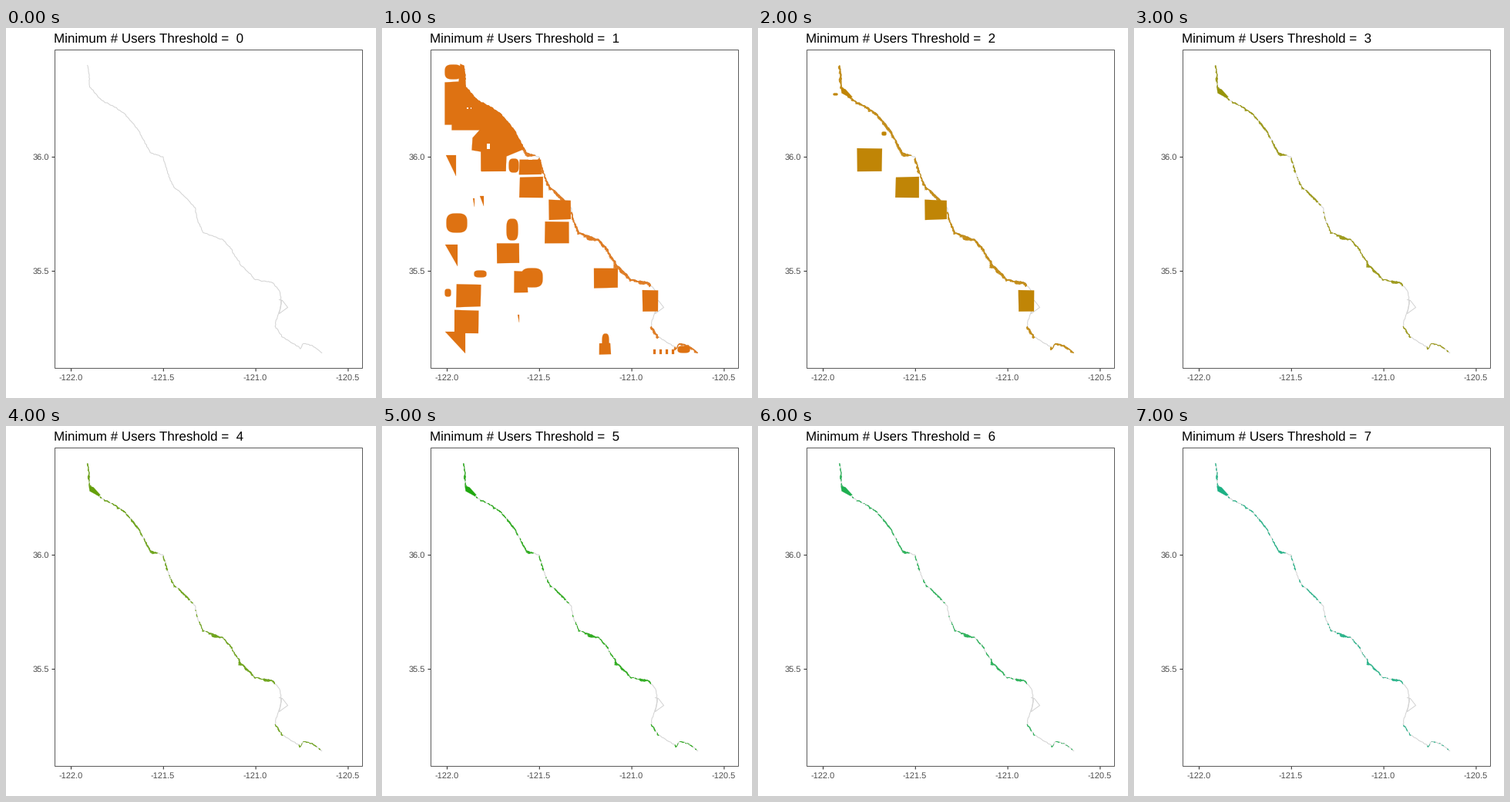
Write a matplotlib script that moves like this. It is 480 px wide and 480 px high and loops after 8000 ms.

```python
import numpy as np
import matplotlib.pyplot as plt
from matplotlib.animation import FuncAnimation
from matplotlib.collections import PolyCollection

SIZE, DPI = 480, 100
PX = 72 / DPI  # points per pixel
plt.rcParams["font.family"] = "Liberation Sans"
plt.rcParams["text.hinting"] = "none"
plt.rcParams["text.hinting_factor"] = 1
rng = np.random.default_rng(7)

COLORS = ["white", "#de7212", "#c08506", "#979409", "#649f0a",
          "#20a80f", "#1eaf50", "#1cb184"]
SEA = np.array([-0.7, 0.7])  # direction from the coast out to sea

# Key points of the shore; fine detail is added as noise
COAST = [
    (105, 48), (108, 62), (108, 76), (124, 94), (137, 100), (153, 110),
    (172, 133), (183, 154), (187, 161), (203, 167), (211, 192), (217, 206),
    (226, 212), (245, 233), (248, 250), (255, 265), (270, 270), (281, 274),
    (293, 288), (303, 305), (323, 326), (346, 330), (355, 342), (357, 357),
    (348, 386), (358, 400), (382, 415), (385, 409), (396, 411), (409, 421),
]
BAY = [(354, 352), (358, 353), (365, 362), (354, 370), (357, 353)]
HEADLAND = [(107, 77), (113, 79), (122, 89), (119, 90), (108, 84)]
INLAND = [(161, 166), (160, 185), (128, 185), (128, 160), (116, 158),
          (117, 142), (126, 132), (90, 132), (90, 125), (81, 125),
          (81, 70), (99, 69), (101, 46)]

# Busy stretches: position x + y, spread, extra width
BUSY = [(172, 8, 1.5), (285, 30, 0.7), (352, 6, 2), (448, 8, 0.8),
        (540, 9, 2.3), (618, 18, 2), (668, 8, 1.8)]
EMPTY = [(362, 372), (470, 483), (681, 735), (760, 792)]

# Patches by extent: x0, y0, x1, y1
SHARED = [(128, 156, 160, 185), (178, 193, 208, 220), (216, 223, 244, 248),
          (338, 340, 358, 367)]
BLOCKS = [(178, 170, 206, 189), (211, 251, 242, 279), (148, 279, 178, 305),
          (171, 315, 188, 343), (275, 311, 305, 337), (96, 332, 128, 361),
          (94, 366, 125, 395), (282, 408, 296, 423)]
WEDGES = [(82, 164, 95, 191), (81, 280, 97, 308), (81, 393, 107, 421),
          (117, 220, 119, 231), (126, 217, 131, 230), (175, 371, 177, 381)]
BLOBS = [(81, 47, 103, 66), (164, 169, 177, 187), (83, 240, 110, 265),
         (161, 247, 176, 275), (119, 314, 135, 323), (180, 311, 208, 336),
         (81, 338, 89, 348), (285, 396, 294, 418), (383, 412, 399, 421)]
SPOTS = [(97, 84, 103, 87), (160, 134, 166, 139)]
HOLES = [(109, 102, 111, 104), (114, 102, 115, 104), (135, 149, 139, 156),
         (189, 166, 194, 170)]


def box(x0, y0, x1, y1):
    return np.array([(x0, y0), (x1, y0), (x1, y1), (x0, y1)], float)


def rough(*extent):
    return box(*extent) + rng.uniform(-0.8, 0.8, (4, 2))


def wedge(x0, y0, x1, y1):
    return np.array([(x0, y0), (x1, y0), (x1, y1)])


def blob(x0, y0, x1, y1):
    a = np.linspace(0, 2 * np.pi, 40, endpoint=False)
    ring = np.column_stack([np.cos(a), np.sin(a)])
    ring = np.sign(ring) * np.abs(ring) ** 0.65
    return (np.array([x0 + x1, y0 + y1]) + ring * [x1 - x0, y1 - y0]) / 2


def resample(points):
    pts = np.array(points, float)
    dist = np.r_[0, np.cumsum(np.hypot(*np.diff(pts, axis=0).T))]
    at = np.arange(0, dist[-1], 1)
    return np.column_stack([np.interp(at, dist, p) for p in pts.T])


def smooth_noise(n, amp):
    return np.convolve(rng.uniform(-amp, amp, n), np.ones(3) / 3, "same")


coast = resample(COAST)
count = len(coast)
place = coast.sum(axis=1)
heat = 1.2 + smooth_noise(count, 2)
for mid, spread, extra in BUSY:
    heat += extra * np.exp(-((place - mid) / spread) ** 2)
for start, end in EMPTY:
    heat[(place > start) & (place < end)] = -9
coast += np.column_stack([smooth_noise(count, 1), smooth_noise(count, 1)])


def band(cut):
    """Quads on the seaward side of the coast, narrower for a higher cut."""
    width = heat - cut
    quads = []
    for i in np.flatnonzero(width[:-1] > 0.4):
        a, b = coast[i:i + 2] - 0.4 * SEA
        off = max(width[i], 1) * SEA
        quads.append([a, b, b + off, a + off])
    return quads


shared = [rough(*e) for e in SHARED]
mainland = np.vstack([coast[place < 342], INLAND])
inland = ([mainland] + shared + [rough(*e) for e in BLOCKS]
          + [wedge(*e) for e in WEDGES] + [blob(*e) for e in BLOBS]
          + [box(x, 416, x + 3, 422) for x in range(351, 382, 8)])


def areas(level):
    if level == 0:
        return []
    if level == 1:
        return band(-1.3) + inland
    if level == 2:
        return band(-1.1) + [HEADLAND] + shared + [blob(*e) for e in SPOTS]
    return band(0.2 + 0.18 * (level - 3)) + [HEADLAND]


fig = plt.figure(figsize=(SIZE / DPI, SIZE / DPI), dpi=DPI, facecolor="white")
ax = fig.add_axes([0, 0, 1, 1])
ax.set_xlim(-0.5, SIZE - 0.5)
ax.set_ylim(SIZE - 0.5, -0.5)
ax.axis("off")

for line in (coast, np.array(BAY)):
    ax.plot(*line.T, color="#d3d3d3", lw=PX, zorder=1)
region = PolyCollection([], linewidths=0.2 * PX, zorder=2)
holes = PolyCollection([box(*e) for e in HOLES], facecolors="white", zorder=3)
ax.add_collection(region, autolim=False)
ax.add_collection(holes, autolim=False)

ax.add_patch(plt.Rectangle((63, 28), 399, 413, fill=False, ec="#5c5c5c",
                           lw=PX, snap=False, zorder=4))
tick = dict(color="#333333", lw=1.1 * PX, solid_capstyle="butt", snap=False,
            zorder=4)
label = dict(color="#4d4d4d", fontsize=11.2 * PX, va="baseline")
for k in range(4):
    x = 84 + 119.8 * k
    ax.plot([x, x], [441.5, 445], **tick)
    ax.text(x - 0.7, 456.3, f"{-122 + k / 2:.1f}", ha="center", **label)
for y, name in ((167, "36.0"), (315, "35.5")):
    ax.plot([59, 62.5], [y, y], **tick)
    ax.text(56, y + 3.3, name, ha="right", **label)
title = ax.text(62, 18.8, "", color="black", fontsize=16.65 * PX,
                va="baseline")


def draw(level):
    region.set_verts(areas(level))
    region.set_color(COLORS[level])
    holes.set_visible(level == 1)
    title.set_text(f"Minimum # Users Threshold =  {level}")
    return region, holes, title


anim = FuncAnimation(fig, draw, frames=8, interval=1000, repeat=True,
                     repeat_delay=0)
plt.show()
```
